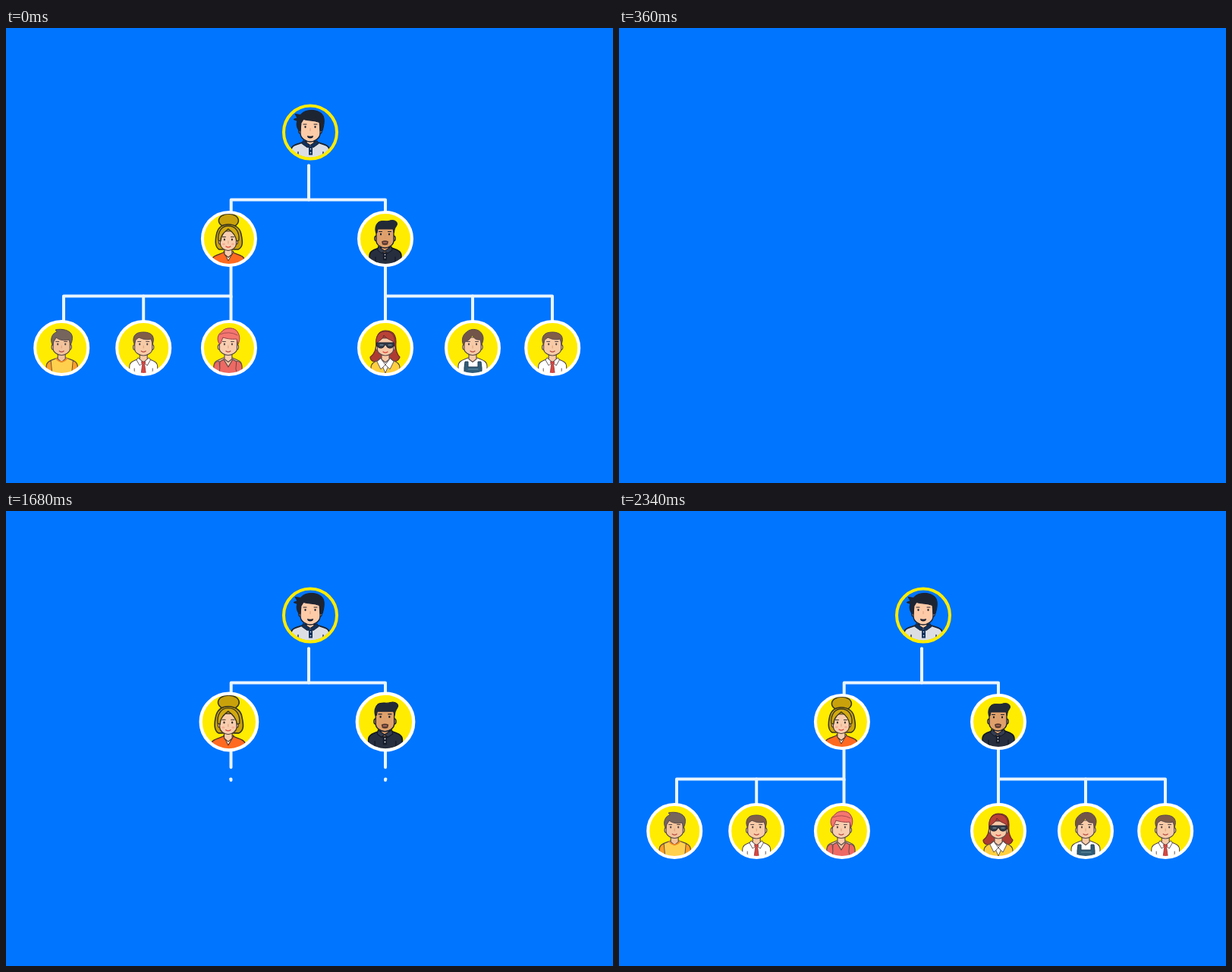
An HTML page for the animation above (3.24 s loop, 800 by 600 pixels).

```html
<!DOCTYPE html>
<html lang="en">
<head>
<meta charset="utf-8">
<title>Team tree</title>
<style>
  html, body { margin: 0; width: 100%; height: 100%; overflow: hidden; background: #0075ff; }
  svg { display: block; width: 100vw; height: 100vh; }
  .line { fill: none; stroke: #e8f4fd; stroke-width: 4; stroke-linecap: round; stroke-linejoin: round; }
</style>
</head>
<body>
<svg viewBox="0 0 800 600">
  <defs><clipPath id="disc"><circle r="33.4"/></clipPath></defs>
  <g id="tree"></g>
</svg>
<script>
const LOOP = 3240, STEP = 30, INTRO = 1050;
const YELLOW = '#ffec00', INK = '#1b2130', SOFT = '#57494a';

const shape = (d, fill, stroke = 'none', width = 1.2) =>
  `<path d="${d}" fill="${fill}" stroke="${stroke}" stroke-width="${width}" stroke-linejoin="round" stroke-linecap="round"/>`;
const stroke = (d, color, width = 1.2) => shape(d, 'none', color, width);
const oval = (x, y, rx, ry, fill, line = 'none', width = 1) =>
  `<ellipse cx="${x}" cy="${y}" rx="${rx}" ry="${ry}" fill="${fill}" stroke="${line}" stroke-width="${width}"/>`;

// Head with neck and ears; top and chin are heights relative to the disc centre.
function head(skin, line, x, top, chin, half, width = 1.1) {
  const mid = (top + chin) / 2;
  return shape(`M${x - 5} ${chin - 5}V${chin + 5}L${x} ${chin + 9}L${x + 5} ${chin + 5}V${chin - 5}Z`, skin, line, width) +
    oval(x - half, mid + 1, 2.2, 3.4, skin, line, width) + oval(x + half, mid + 1, 2.2, 3.4, skin, line, width) +
    shape(`M${x - half} ${top}H${x + half}V${mid + 4}C${x + half} ${chin - 4} ${x + 5} ${chin} ${x} ${chin}C${x - 5} ${chin} ${x - half} ${chin - 4} ${x - half} ${mid + 4}Z`, skin, line, width);
}
const face = (x, y, gap, mouth, color) =>
  oval(x - gap, y, 1.1, 1.4, color) + oval(x + gap, y, 1.1, 1.4, color) +
  stroke(`M${x - gap - 2.5} ${y - 3.5}h4M${x + gap - 1.5} ${y - 3.5}h4`, color, 1) +
  stroke(`M${x} ${y + 2}v3`, '#d99a78', .9) + mouth;
const smile = (x, y, color = '#b5493f') => stroke(`M${x - 3} ${y}q3 2.2 6 0`, color, 1.2);
const torso = (fill, line, half, top, x = 0, width = 1.1) =>
  shape(`M${x - half} 38V${top + 11}C${x - half} ${top + 4} ${x - 13} ${top + 3} ${x - 6} ${top}H${x + 6}C${x + 13} ${top + 3} ${x + half} ${top + 4} ${x + half} ${top + 11}V38Z`, fill, line, width);

const avatars = {
  boss: () => torso('#dcdee4', INK, 25, 12, 0, 1.8) +
    stroke('M-16 26V35M17 26V35', INK, 1.3) +
    head('#fdcba8', INK, 0, -18, 12.5, 13, 1.4) +
    shape('M-9 11L0 17L9 11L11 15L4 20L0 17L-4 20L-11 15Z', '#12315c', INK, 1) +
    shape('M-2 18H3V30H-2Z', '#12315c') + oval(.5, 22, .8, .8, '#fff') + oval(.5, 27, .8, .8, '#fff') +
    shape('M-15 -2C-19 -8 -18 -13 -17 -15L-22 -17L-17 -19L-20 -24L-13 -23C-8 -30 6 -31 13 -26C20 -22 19 -12 16 -2L13 -2L12 -13C5 -16 -3 -15 -9 -17L-12 -12L-13 -2Z', '#1e2532', INK, 1) +
    face(0, -7, 6.5, shape('M-4 4.5Q0 6 4 4.5Q4 8 0 8Q-4 8 -4 4.5Z', INK), INK),

  bun: () => oval(-.5, -24, 13, 9, '#c9a20b', '#363320', 1.5) +
    shape('M-13 14C-20 10 -17 -4 -16 -8C-13 -18 -5 -19 -1 -19C8 -19 15 -14 16 -6C18 3 19 11 12 14Z', '#c9a20b', '#363320', 1.5) +
    torso('#ff6a20', '#513027', 21.5, 18, -1, 1.3) +
    shape('M-7 17L-1 29L6 17Z', '#fff0dd', '#513027', 1) +
    head('#f8cdae', '#4a372c', -1, -10, 15.5, 10.5) +
    shape('M-14 2C-15 -9 -10 -17 -1 -17C9 -17 14 -9 13 2L10 3C9 -4 5 -9 -1 -13C-6 -9 -11 -5 -11 3Z', '#d2aa10', '#363320', 1.3) +
    face(-1, 1, 5, smile(-1, 10, '#d9473c'), '#36302c') +
    oval(-7, 7, 1.8, 1.2, '#f5aa91') + oval(5, 7, 1.8, 1.2, '#f5aa91'),

  quiff: () => torso('#272e3e', '#111722', 21, 11, 0, 1.5) +
    stroke('M-13 24V35M13 24V35', '#111722', 1.2) +
    head('#dfa06b', INK, -.5, -15, 12, 11.5, 1.3) +
    shape('M-9 10L-1 16L8 10L9 15L3 19L-1 16L-5 19L-10 15Z', '#343d51', '#111722', 1) +
    shape('M-2.2 18H1.2V28H-2.2Z', '#1a2130', '#111722', .8) + oval(-.5, 21, .8, .8, '#fff') + oval(-.5, 25, .8, .8, '#fff') +
    shape('M-12.5 -8C-14 -13 -13 -19 -9 -22C-4 -25 1 -22 6 -24C13 -26 17 -21 15 -18C14 -15 12 -15 11.5 -8L10 -13H-10L-11 -8Z', '#222a38', INK, 1) +
    face(-.5, -6, 5.5, shape('M-5 3.5Q-.5 1 4 3.5L3 7.5Q-.5 9 -4 7.5Z', '#54382e') + stroke('M-2.5 5h4', '#e8877a', 1), INK),

  tee: () => torso('#ffd04d', SOFT, 20.5, 13, .5) +
    shape('M-20 38V24Q-19 18 -14 17L-12 38Z', '#ff9e24', SOFT, .9) + shape('M21 38V24Q20 18 15 17L13 38Z', '#ff9e24', SOFT, .9) +
    head('#f3c39b', SOFT, 0, -14, 9.5, 11) +
    shape('M-7 14Q0 22 7 14', 'none', '#f08a24', 1.8) +
    shape('M-12 -4C-16 -12 -12 -20 -6 -21L-8 -24C0 -26 12 -24 14 -16C15 -11 13 -7 12 -4L10 -11C3 -9 -4 -11 -7 -14L-10 -9Z', '#75655c', SOFT, 1) +
    face(0, -5, 5, smile(0, 4), SOFT),

  tie: () => torso('#fff', SOFT, 18.5, 14) +
    stroke('M-12 27V36M12 27V36', SOFT, .9) +
    head('#f8cba7', SOFT, 0, -14, 10, 11.5) +
    shape('M-7 13L0 19L-5 23L-9 16ZM7 13L0 19L5 23L9 16Z', '#fff', SOFT, .9) +
    shape('M-2.5 18H2.5L1.5 22L3 33L0 36L-3 33L-1.5 22Z', '#d94742', '#8e3434', .8) +
    shape('M-12 -5C-15 -11 -13 -18 -7 -20C0 -22 9 -21 12 -16C14 -12 13 -8 12 -5L10 -12C4 -10 -2 -12 -6 -14L-10 -11Z', '#805d49', SOFT, 1) +
    face(0, -5, 5, smile(0, 4), SOFT),

  vest: () => torso('#f4c5a3', SOFT, 18.5, 13, -1.5) +
    shape('M-13 38L-12 18L-7 15L-1 25L5 15L10 18L11 38Z', '#ee6963', SOFT) +
    shape('M-20 38V24Q-19 18 -13 17L-12 27L-14 38ZM17 38V24Q16 18 10 17L9 27L11 38Z', '#ee6963', SOFT, .9) +
    head('#f9ceb0', SOFT, -1, -14, 9.5, 11.5) +
    shape('M-13 -6C-17 -12 -14 -19 -10 -21C-6 -28 9 -28 12 -20C15 -15 14 -9 12 -5L10 -12C3 -11 -5 -13 -8 -14L-11 -6Z', '#f47670', '#963f46', 1) +
    stroke('M-12 -18Q0 -23 11 -17', '#963f46', .8) +
    face(-1, -5, 5, smile(-1, 4), SOFT),

  glasses: () => shape('M-12 -8C-12 -19 -6 -23 0 -23C9 -23 14 -18 14 -8C13 2 16 9 19 12C17 18 11 19 5 17H-9C-14 20 -20 17 -20 12C-14 8 -12 0 -12 -8Z', '#ad3c32', '#6a2c2d', 1.2) +
    torso('#ffcf3e', SOFT, 19, 15) +
    shape('M-8 14L0 33L8 14Z', '#fff', SOFT, .9) +
    head('#f8c9a7', SOFT, 0, -13, 10, 10.5) +
    shape('M-6 14L0 22L-6 28L-11 18ZM6 14L0 22L6 28L11 18Z', '#fff', SOFT, .9) +
    shape('M-12 -2C-14 -15 -9 -22 0 -22C10 -22 14 -14 12 -2L10 -9C5 -11 1 -13 -2 -17C-3 -12 -7 -10 -10 -8Z', '#b94237', '#6a2c2d', 1) +
    shape('M-11 -7H11V-3Q9 1 5 0Q2 0 1 -4H-1Q-2 0 -5 0Q-9 1 -11 -3Z', '#333c48', INK, 1) +
    stroke('M-7 -4h4M4 -4h4', '#87a2b4', 1.2) + smile(0, 5, '#d43e38'),

  overalls: () => torso('#fff', SOFT, 19, 13) +
    shape('M-11 38V26L-10 18H-6V25H7V18H11L12 26V38Z', '#315d78', '#273f51', 1) +
    stroke('M-6 28H7', '#6f97aa', .9) +
    head('#f8cba8', SOFT, 0, -14, 9.5, 11) +
    shape('M-12 -4C-15 -9 -14 -17 -8 -21C-2 -27 9 -25 12 -19C16 -13 13 -8 12 -4L10 -11C3 -10 1 -15 -1 -17C-3 -11 -7 -9 -10 -8Z', '#725449', SOFT, 1) +
    face(0, -5, 5, smile(0, 4), SOFT),
};

// name, x, y, start of pop, open ring
const people = [
  ['boss', 401, 137.5, 1050, true],
  ['bun', 293.9, 278, 1440], ['quiff', 500, 278, 1440],
  ['vest', 293.9, 422, 1890], ['glasses', 500, 422, 1890],
  ['tie', 181.2, 422, 1950], ['overalls', 615, 422, 1950],
  ['tee', 73.2, 422, 2040], ['tie', 720.2, 422, 2040],
];
// path, start, end
const links = [
  ['M399 181.5V226.5H296.7V242', 1290, 1500], ['M399 181.5V226.5H500V242', 1290, 1500],
  ['M296.5 314V390', 1590, 1830], ['M500 314V390', 1590, 1830],
  ['M296.5 355V353.5H76V414', 1660, 2070], ['M500 355V353.5H720V414', 1660, 2070],
  ['M181.2 353.5V400', 1840, 1980], ['M615 353.5V400', 1840, 1980],
];

const tree = document.getElementById('tree');
tree.innerHTML =
  links.map(([d]) => `<path class="line" pathLength="1" d="${d}"/>`).join('') +
  people.map(([name, , , , open]) => `<g class="person">
    <circle r="35" fill="${open ? 'none' : YELLOW}"/>
    <g clip-path="url(#disc)">${avatars[name]()}</g>
    <circle r="35" fill="none" stroke="${open ? YELLOW : '#fff'}" stroke-width="4"/></g>`).join('');
const lineNodes = [...tree.querySelectorAll('.line')];
const personNodes = [...tree.querySelectorAll('.person')];

const ease = (t, from, to) => {
  const p = Math.min(1, Math.max(0, (t - from) / (to - from)));
  return p * p * (3 - 2 * p);
};
const pop = (t, start) => 1.1 * ease(t, start, start + 200) - .1 * ease(t, start + 200, start + 300);
const show = (node, on) => node.setAttribute('visibility', on ? 'inherit' : 'hidden');

function draw(t) {
  const leaving = t < INTRO;
  const at = leaving ? LOOP : t;
  tree.setAttribute('transform', `translate(0 ${leaving ? 600 * ease(t, 0, 450) : 0})`);
  show(tree, t < 360 || !leaving);
  links.forEach(([, start, end], i) => {
    const p = ease(at, start, end);
    show(lineNodes[i], p > 0);
    lineNodes[i].setAttribute('stroke-dasharray', p < 1 ? `${p} 2` : 'none');
  });
  people.forEach(([, x, y, start], i) => {
    const s = pop(at, start);
    show(personNodes[i], s > 0);
    personNodes[i].setAttribute('transform', `translate(${x} ${y}) scale(${s})`);
  });
}

const began = performance.now();
function tick() {
  const t = (performance.now() - began) % LOOP;
  draw(Math.floor(t / STEP) * STEP);
  requestAnimationFrame(tick);
}
tick();
</script>
</body>
</html>
```
